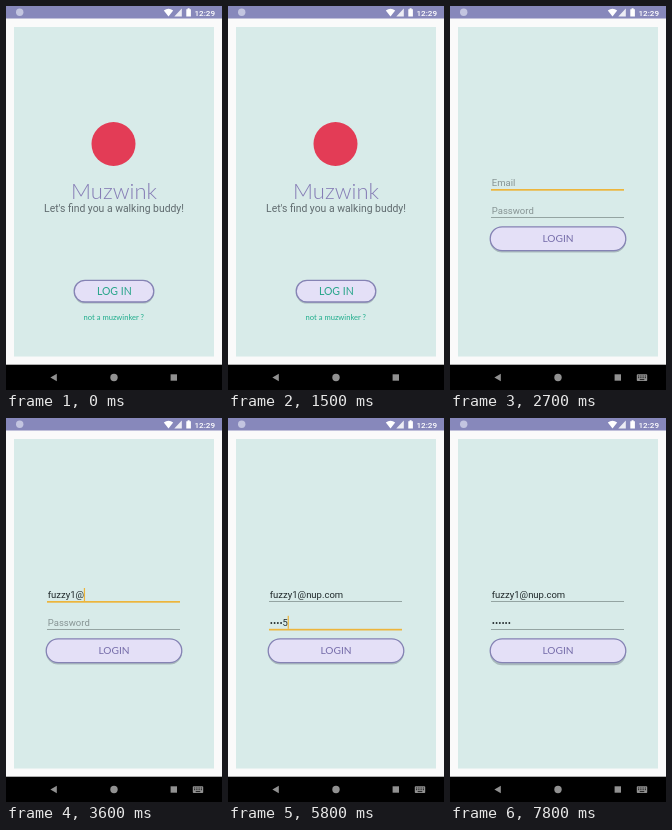
Animation, 216 px wide and 384 px high, one loop 8000 ms. Source, as an HTML page:

```html
<!DOCTYPE html>
<html lang="en">
<head>
<meta charset="utf-8">
<title>Login demo</title>
<style>
html, body { margin: 0; width: 100%; height: 100%; overflow: hidden; background: #fafafa; }
svg { display: block; width: 100vw; height: 100vh; }
text { font-family: Roboto, sans-serif; }
.hand { font-family: Lato, sans-serif; text-anchor: middle; }
.field { font-size: 9.5px; }
.button { fill: #e4e0f7; stroke: #8583b4; stroke-width: 1.3; }
.shadow { fill: #6f7c88; opacity: .45; }
</style>
</head>
<body>
<svg viewBox="0 0 216 384">
  <rect width="216" height="384" fill="#fafafa"/>
  <rect x="8" y="21" width="200" height="329.5" fill="#d8ebe9"/>

  <!-- status bar -->
  <rect width="216" height="12.5" fill="#8788bb"/>
  <circle cx="13.7" cy="6.2" r="3.7" fill="#c3c5e0"/>
  <g fill="#fff">
    <path d="M157.8 4.6Q162.5 .8 167.2 4.6L162.5 10.4Z"/>
    <path d="M168.3 10.4H175.8V2.6Z" opacity=".85"/>
    <path d="M180.3 3.2h1.3v-.9h2v.9h1.3v7.2h-4.6z"/>
    <text x="188.5" y="9.6" font-size="8.1" font-weight="500">12:29</text>
  </g>

  <!-- navigation bar -->
  <rect y="358.7" width="216" height="25.3"/>
  <g fill="#919191">
    <path d="M44.4 371.5L50.8 367.8V375.2Z"/>
    <circle cx="108" cy="371.5" r="3.7"/>
    <rect x="164.6" y="368.3" width="6.4" height="6.4"/>
    <g id="keys">
      <rect x="186.8" y="368.2" width="10.4" height="6.8" rx=".8"/>
      <path d="M188 370h8M188 371.7h8" stroke="#000" stroke-width=".8" stroke-dasharray="1 .75"/>
      <path d="M189.7 373.6h4.6" stroke="#000" stroke-width=".8"/>
    </g>
  </g>

  <g id="welcome">
    <circle cx="107.5" cy="138" r="22" fill="#e33c56"/>
    <text class="hand" x="108" y="193" font-size="22" font-weight="300" fill="#857cb5">Muzwink</text>
    <text x="108" y="206" font-size="10.4" text-anchor="middle" fill="#616c70">Let's find you a walking buddy!</text>
    <rect class="shadow" x="68" y="275.6" width="80" height="22" rx="11"/>
    <rect class="button" x="68.2" y="274.4" width="79.6" height="21.6" rx="10.8"/>
    <text class="hand" x="108.3" y="288.8" font-size="10.5" fill="#28a58a">LOG IN</text>
    <text class="hand" x="107.8" y="313.8" font-size="7.6" fill="#1fad8c">not a muzwinker ?</text>
  </g>

  <g id="form">
    <text id="email" class="field" x="41.8" y="180"/>
    <rect id="emailLine" x="41" width="133"/>
    <text id="pass" class="field" x="41.8" y="207.8"/>
    <rect id="passLine" x="41" width="133"/>
    <rect id="caret" width="1.2" height="13" fill="#edb53c"/>
    <rect id="lift" class="shadow" x="40" y="222.4" width="136" height="24" rx="12"/>
    <rect class="button" x="40.2" y="220.8" width="135.6" height="23.8" rx="11.9"/>
    <text class="hand" x="108" y="235.6" font-size="10.2" fill="#766daa">LOGIN</text>
  </g>
</svg>
<script>
const LOOP = 8000, OPEN = 1900, KEYS = 2200, TAB = 5100, BLUR = 6300, PRESS = 7500;
const address = 'fuzzy1@nup.com', secret = '123456';
const emailTimes = [2800, 2950, 3100, 3200, 3300, 3450, 3600, 4300, 4400, 4500, 4600, 4700, 4800, 4900];
const passTimes = [5200, 5350, 5500, 5600, 5750, 5900];
const events = [OPEN, ...emailTimes, TAB, ...passTimes];

const $ = id => document.getElementById(id);
const show = (id, on) => $(id).setAttribute('display', on ? 'inline' : 'none');
const typed = (times, t) => times.filter(k => k <= t).length;

function setField(id, value, hint, baseY, focused) {
  const text = $(id), line = $(id + 'Line');
  text.textContent = value || hint;
  text.setAttribute('fill', value ? '#20292b' : '#879494');
  line.setAttribute('y', baseY + (focused ? 3 : 3.2));
  line.setAttribute('height', focused ? 1.7 : .8);
  line.setAttribute('fill', focused ? '#edb53c' : '#849391');
  if (focused) {
    const width = value ? text.getComputedTextLength() : 0;
    $('caret').setAttribute('x', 41.5 + width);
    $('caret').setAttribute('y', baseY - 10);
  }
}

function draw(t) {
  show('welcome', t < OPEN);
  show('form', t >= OPEN);
  show('keys', t >= KEYS);
  if (t < OPEN) return;

  const count = typed(passTimes, t);
  const hidden = t >= BLUR ? count : Math.max(0, count - 1);
  const password = '•'.repeat(hidden) + secret.slice(hidden, count);
  setField('email', address.slice(0, typed(emailTimes, t)), 'Email', 180, t < TAB);
  setField('pass', password, 'Password', 207.8, t >= TAB && t < BLUR);

  // the caret blinks from the latest key press
  const last = events.filter(e => e <= t).pop();
  show('caret', t < BLUR && (t - last) % 1000 < 500);

  const press = Math.min(1, Math.max(0, (t - PRESS) / 300));
  $('lift').setAttribute('y', 222.4 + press * .8);
}

function frame() {
  draw(performance.now() % LOOP);
  requestAnimationFrame(frame);
}
frame();
</script>
</body>
</html>
```
